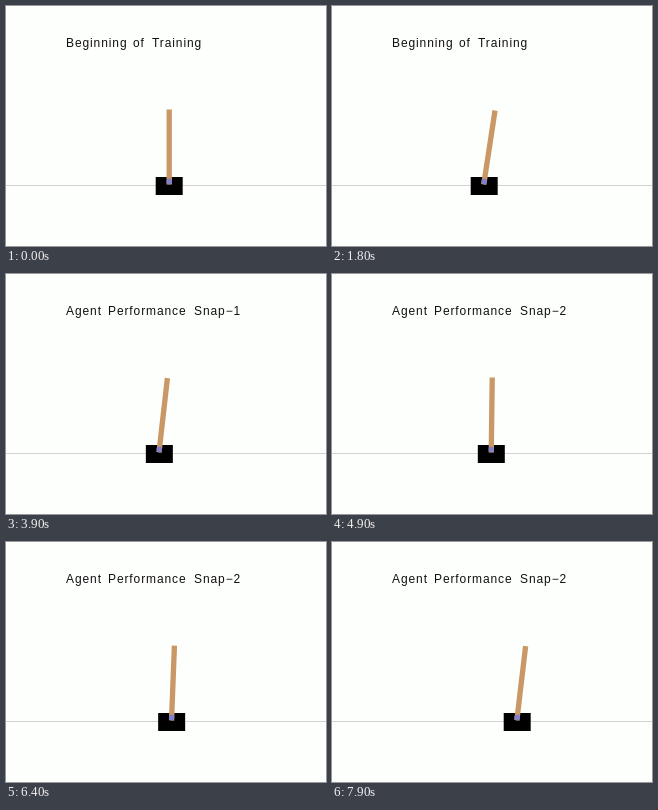
Recreate the animation shown at these times as an HTML page. Size 320 by 240 pixels, loop 8000 ms.

```html
<!DOCTYPE html>
<html lang="en">
<head>
<meta charset="utf-8">
<title>Cart and pole</title>
<style>
  html, body { margin: 0; width: 100%; height: 100%; overflow: hidden; background: #fdfffc; }
  svg { display: block; width: 100vw; height: 100vh; }
  text { font: 12px "Liberation Sans", Arial, sans-serif; letter-spacing: 0.9px; fill: #111; }
</style>
</head>
<body>
<svg viewBox="0 0 320 240">
  <text id="label" y="41"></text>
  <path d="M0 179.5H320" stroke="#d1d3d0"/>
  <!-- 600 x 400 world squeezed onto the stage -->
  <g id="cart">
    <rect x="-25.3" y="-15" width="50.6" height="30"/>
    <g transform="translate(0 -7.5)">
      <rect id="pole" x="-5" y="-120" width="10" height="125" fill="#ca9866"/>
      <circle r="5" fill="#8080cc"/>
    </g>
  </g>
</svg>
<script>
const LOOP = 8000, STEP = 100;

// Each word with its left edge
const beginning = [["Beginning", 60], ["of", 127], ["Training", 146]];
const snapshot = n => [["Agent", 60], ["Performance", 102], ["Snap−" + n, 188]];
const first = snapshot(1), second = snapshot(2);

// One sustained push: the cart gathers speed while the pole tips (radians)
const pushes = [
  { words: beginning, start: 0, end: 600, x: [163.2, 168.5], lean: [0, -0.19] },
  { words: beginning, start: 700, end: 1200, x: [162, 165.3], lean: [-0.03, -0.152] },
  { words: beginning, start: 1300, end: 1800, x: [157.3, 152.2], lean: [0.02, 0.17] },
  { words: first, start: 1900, end: 3700, x: [158.7, 153], lean: [-0.034, 0.133] },
  { words: first, start: 3700, end: 4500, x: [153, 161.3], lean: [0.133, -0.03] },
  { words: second, start: 4600, end: 7900, x: [159.2, 185.2], lean: [0.014, 0.132] }
];

const byId = id => document.getElementById(id);
const label = byId("label"), cart = byId("cart"), pole = byId("pole");
const accelerate = u => Math.min(u, 1) ** 2.3;
const mix = ([from, to], amount) => from + (to - from) * amount;
let shownWords;

function showWords(words) {
  if (words === shownWords) return;
  shownWords = words;
  label.innerHTML = words.map(([word, x]) => `<tspan x="${x}">${word}</tspan>`).join(" ");
}

function draw(now) {
  const time = Math.floor((now % LOOP) / STEP) * STEP;
  const { words, start, end, x, lean } = pushes.findLast(push => push.start <= time);
  const amount = accelerate((time - start) / (end - start));
  showWords(words);
  cart.setAttribute("transform", `translate(${mix(x, amount)} 180) scale(${320 / 600} ${240 / 400})`);
  pole.setAttribute("transform", `rotate(${mix(lean, amount) * 180 / Math.PI})`);
}

const startTime = performance.now();
function tick() {
  draw(performance.now() - startTime);
  requestAnimationFrame(tick);
}
tick();
</script>
</body>
</html>
```
